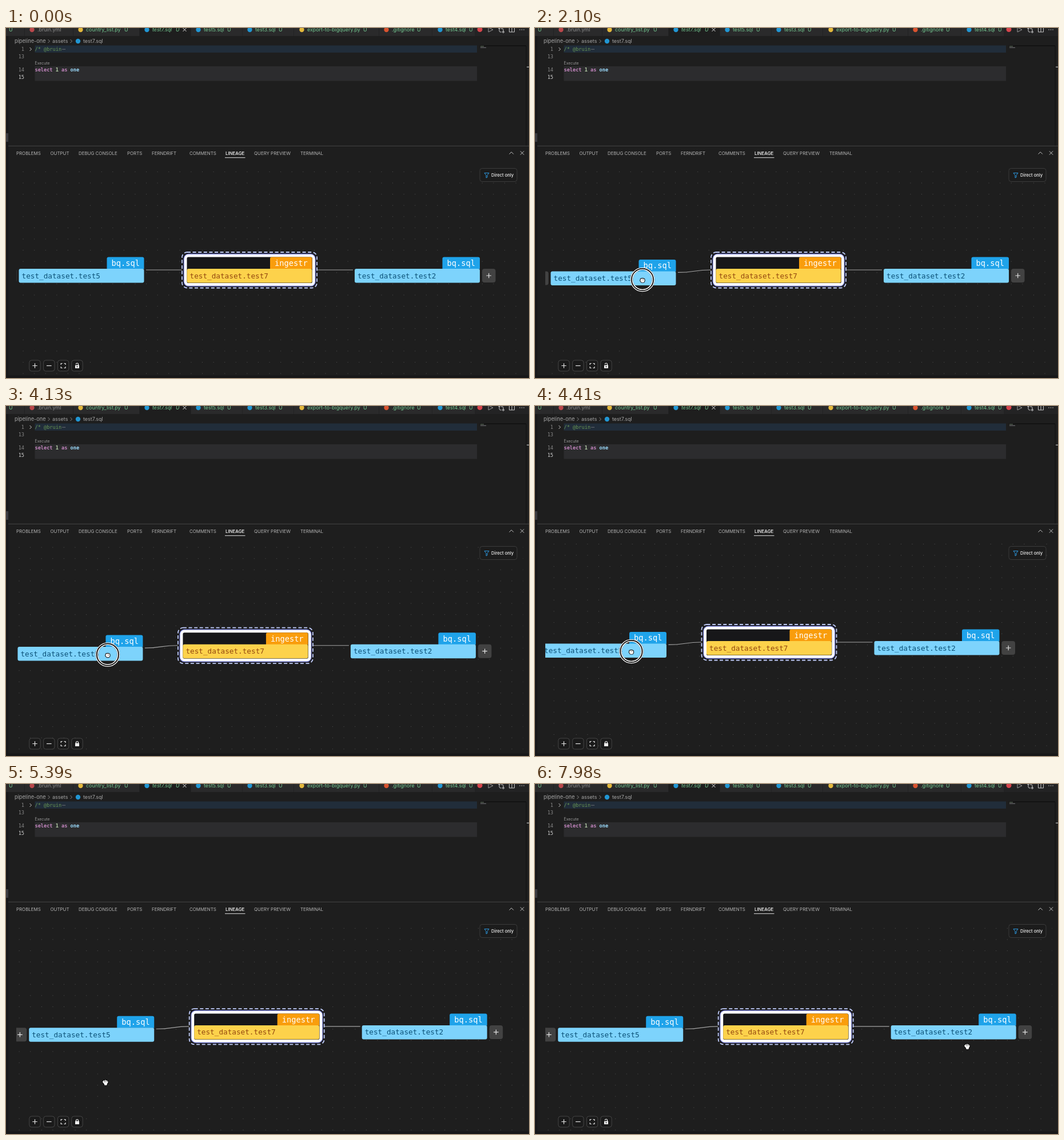
Write an HTML page with a canvas that moves like this. It is 915 by 612 pixels and loops after 8 s.

```html
<!DOCTYPE html>
<html lang="en">
<head>
<meta charset="utf-8">
<title>Lineage panel</title>
<style>
html, body { margin: 0; width: 100%; height: 100%; overflow: hidden; background: #1e1e1e; }
canvas { display: block; }
</style>
</head>
<body>
<canvas id="stage" width="915" height="612"></canvas>
<script>
const ctx = document.getElementById('stage').getContext('2d');
const LOOP = 8000, STEP = 70;
const UI = 'Inter, sans-serif', MONO = '"DejaVu Sans Mono", monospace';
const GREEN = '#73c991', SQL_BLUE = '#2196d3';

// Keys are [time, x, y]
const cursorKeys = [
  [350, 423, 605], [420, 300, 543], [490, 164, 473], [630, 164, 473], [910, 182, 435],
  [1260, 182, 435], [1540, 184, 452], [1680, 184, 455], [1890, 184, 455], [2100, 188, 440],
  [2170, 188, 440], [2520, 137, 593], [2590, 137, 593], [2940, 123.5, 589],
  [3570, 123.5, 589], [3850, 185, 439], [3920, 185, 439], [4410, 168.5, 429],
  [4480, 168.5, 429], [4900, 210, 451], [5110, 197.7, 440], [5320, 197.7, 440],
  [5460, 150, 602], [5600, 150, 602], [5950, 127.5, 595], [6720, 127.5, 595],
  [6860, 403, 438], [6930, 126, 584], [7210, 126, 584], [7420, 228, 478],
  [7560, 228, 478], [7700, 480, 456], [7770, 690, 484], [7840, 690, 484], [7980, 756, 458]
];
const nodeKeys = [
  [1260, 0, 0], [1540, 1, 17.3], [1680, 1, 20], [1890, 1, 20], [2100, 5, 4.4]
];
const panKeys = [
  [3920, 0, 0], [4410, -16.5, -10], [4480, -16.5, -10], [4900, 25, 12.3], [5110, 12.7, 0.9]
];
const presses = [[1050, 2240], [3080, 3290], [3920, 5250], [6580, 6720]];

function at(keys, t) {
  const i = keys.findIndex(k => k[0] > t);
  if (i === 0) return keys[0].slice(1);
  if (i < 0) return keys[keys.length - 1].slice(1);
  const [a, b] = [keys[i - 1], keys[i]], p = (t - a[0]) / (b[0] - a[0]);
  return [a[1] + (b[1] - a[1]) * p, a[2] + (b[2] - a[2]) * p];
}

function text(str, x, y, color, size, family = UI, style = '') {
  ctx.font = `${style} ${size}px ${family}`;
  ctx.fillStyle = color;
  ctx.fillText(str, x, y);
}
function rect(x, y, w, h, color) {
  ctx.fillStyle = color;
  ctx.fillRect(x, y, w, h);
}
function round(x, y, w, h, r, fill, stroke, width = 1) {
  ctx.beginPath();
  ctx.roundRect(x, y, w, h, r);
  if (fill) { ctx.fillStyle = fill; ctx.fill(); }
  if (stroke) { ctx.strokeStyle = stroke; ctx.lineWidth = width; ctx.stroke(); }
}
function line(d, color, width = 1) {
  ctx.strokeStyle = color;
  ctx.lineWidth = width;
  ctx.stroke(new Path2D(d));
}
function dot(x, y, r, color) {
  ctx.beginPath();
  ctx.arc(x, y, r, 0, 7);
  ctx.fillStyle = color;
  ctx.fill();
}
function ring(x, y, r, color, width) {
  ctx.beginPath();
  ctx.arc(x, y, r, 0, 7);
  ctx.strokeStyle = color;
  ctx.lineWidth = width;
  ctx.stroke();
}
function plus(x, y, arm, color = '#e4e4e4') {
  line(`M${x - arm} ${y}h${2 * arm}M${x} ${y - arm}v${2 * arm}`, color, 1.2);
}

// [left edge, icon colour, label, label x, status x]
const fileTabs = [
  [32, '#b9474b', '.bruin.yml', 55, 0],
  [117, '#e3b83c', 'country_list.py', 140, 207],
  [233, SQL_BLUE, 'test7.sql', 256, 297],
  [323, SQL_BLUE, 'test5.sql', 346, 387],
  [413, SQL_BLUE, 'test3.sql', 436, 477],
  [503, '#e3b83c', 'export-to-bigquery.py', 527, 625],
  [652, '#d9532f', '.gitignore', 675, 719],
  [745, SQL_BLUE, 'test4.sql', 769, 810]
];

function drawTabs() {
  rect(0, 0, 915, 14, '#2a2a2b');
  rect(820, 0, 95, 14, '#232324');
  rect(233, 0, 90, 14, '#1e1e1e');
  text('U', 5, 6, GREEN, 8.8);
  for (const [left, color, label, x, status] of fileTabs) {
    const style = left === 233 ? 'italic' : '';
    rect(left, 0, 1, 14, '#222223');
    dot(x - 9.5, 3, 4.2, color);
    text(label, x, 6, status ? GREEN : '#8f8f8f', 8.9, UI, style);
    if (status) text('U', status, 6, GREEN, 8.8, UI, style);
  }
  line('M309.5 0l6 6m0-6l-6 6', '#e0e0e0');
  dot(829, 2.5, 4.5, '#d6454c');
  line('M844 -1v8l8-4z', '#999');
  line('M863 0v5a2 2 0 0 0 2 2h2M870 7v-4a2 2 0 0 0-2-2h-2', '#c5c5c5');
  ring(863, 0, 1.4, '#c5c5c5', 1);
  ring(870, 7, 1.4, '#c5c5c5', 1);
  line('M880.5 -1v8h9v-8M885 -1v8', '#c5c5c5');
  for (let x = 899; x < 908; x += 3.5) dot(x, 3, 0.8, '#c5c5c5');
}

function drawEditor() {
  const gray = '#a5a5a5';
  text('pipeline-one', 15, 26.3, gray, 9.2);
  text('assets', 81, 26.3, gray, 9);
  text('test7.sql', 135, 26.3, gray, 9);
  line('M73.500 20l3 3-3 3M112.500 20l3 3-3 3', '#888');
  dot(126, 23, 4.2, SQL_BLUE);

  rect(50.5, 30.5, 773.5, 12.5, '#212d3a');
  rect(50.5, 67, 773.5, 25.5, '#2c2c2e');
  ctx.textAlign = 'right';
  [['1', 40], ['13', 52.8], ['14', 76.2], ['15', 89]].forEach(([n, y]) =>
    text(n, 32, y, n === '15' ? '#d0d0d0' : '#858585', 8.6, MONO));
  ctx.textAlign = 'left';
  line('M41.500 34l3 3-3 3', '#c5c5c5');
  text('/* @bruin', 50.5, 40, '#6a9955', 8.6, MONO);
  for (let x = 98.5; x < 104; x += 2) rect(x, 36.7, 1.4, 1, '#8a8a8a');
  text('Execute', 50.5, 64.2, '#999', 6.9);
  [['select', 0, '#c586c0'], ['1', 7, '#b5cea8'], ['as', 9, '#c586c0'], ['one', 12, '#9cdcfe']]
    .forEach(([word, col, color]) =>
      text(word, 50.5 + col * 5.17, 76.2, color, 8.6, MONO, 'bold'));

  rect(829, 30.5, 81, 1.2, '#0c0c0c');
  rect(830, 31.500, 6, 1, '#6a7d68');
  rect(830, 33.800, 10, 1, '#77777c');
  rect(909.5, 31, 1, 175, '#111');
  rect(911, 67.5, 4, 1.5, '#a0a0a0');
  rect(0, 14, 4, 598, '#18181a');
  rect(0, 184, 4, 15, '#3a3a40');
}

function drawPanelHeader() {
  rect(4, 205.8, 911, 1, '#454545');
  [['PROBLEMS', 18], ['OUTPUT', 77.5], ['DEBUG CONSOLE', 127], ['PORTS', 212],
   ['FERNDRIFT', 255], ['COMMENTS', 321], ['LINEAGE', 384], ['QUERY PREVIEW', 434],
   ['TERMINAL', 515]].forEach(([label, x]) => {
    const active = label === 'LINEAGE';
    text(label, x, 222, active ? '#fff' : '#b4b4b4', 7.9, UI, active ? '500' : '');
  });
  rect(383, 226.2, 35.5, 1, '#e0e0e0');
  line('M880.500 220.500l3.700-3.700 3.700 3.700M899.800 215.300l6.400 6.400m0-6.400l-6.400 6.400', '#c5c5c5');
}

function drawPlusButton(x, y) {
  round(x, y, 23.5, 24, 4, '#424242');
  plus(x + 11.7, y + 12, 4.3);
}

// x, y is the top left corner of the body; the tag sits above its right end.
function drawNode(x, y, name, tag, tagWidth, [body, ink, tagColor]) {
  round(x + 219 - tagWidth, y - 20.5, tagWidth, 21, [3, 3, 0, 0], tagColor);
  round(x, y, 219, 24.5, 3, body);
  text(tag, x + 219 - tagWidth + 8, y - 5, '#fff', 13.7, MONO);
  text(name, x + 5, y + 16.5, ink, 12.7, MONO);
}

function drawGraph(dx, dy, px, py) {
  const gap = 19.59, sky = ['#7dd3fc', '#0c5278', '#1fa3ea'], amber = ['#fdd24b', '#93470f', '#f99d0c'];
  ctx.save();
  ctx.beginPath();
  ctx.rect(18, 237, 886.500, 370);
  ctx.clip();
  for (let x = 30 + px - 2 * gap; x < 905; x += gap)
    for (let y = 251.4 + py - gap; y < 607; y += gap)
      rect(x - 0.5, y - 0.5, 1.1, 1.1, '#4c4c4c');

  ctx.translate(px, py);
  const sx = 245 + dx, sy = 423 + dy, mid = (sx + 307.5) / 2;
  line(`M${sx} ${sy}C${mid} ${sy} ${mid} 423 307.500 423M544.500 423H607`, '#a3a3a3', 1.1);

  drawPlusButton(-5 + dx, 421 + dy);
  drawNode(22.5 + dx, 421 + dy, 'test_dataset.test5', 'bq.sql', 65, sky);
  drawNode(610, 421, 'test_dataset.test2', 'bq.sql', 65.5, sky);
  drawPlusButton(833, 421);

  ctx.setLineDash([6, 3.6]);
  round(308, 392, 236, 62.5, 9, null, '#bfcbfb', 1.8);
  ctx.setLineDash([]);
  round(311.3, 395.3, 229.7, 56, 8, '#171719', '#626bd0', 1.4);
  round(314.1, 398.2, 224.2, 50.2, 5, null, '#fff', 4.8);
  drawNode(316.5, 421, 'test_dataset.test7', 'ingestr', 73.5, amber);
  ctx.restore();
}

function drawControls(locked, hover) {
  round(829, 245.500, 65, 23, 4, '#1c1c1c', '#3b3b3b');
  line('M837 253.500h8l-3 4v3.500l-2 1v-4.500z', '#2b95dc');
  text('Direct only', 849, 260, '#f0f0f0', 7.6, UI, '500');

  for (const x of [50.5, 75.3, 100.1, 124.5])
    round(x - 9.7, 581, 19.4, 19, 4, hover && x > 120 ? '#424242' : '#1a1a1a', '#454545');
  plus(50.5, 590.5, 4.2);
  line('M71 590.500h8.600', '#e4e4e4', 1.2);
  line('M96.200 589v-2.500h2.500M101.500 586.500h2.500v2.500M104 592v2.500h-2.500M98.700 594.500h-2.500v-2.500', '#e4e4e4', 1.2);
  rect(121, 589.5, 7, 5.5, '#eee');
  line(locked ? 'M122.500 590v-1.500a2 2 0 0 1 4 0v1.500' : 'M122.500 588a2 2 0 0 1 4 0v2', '#eee', 1.2);
  if (!locked) dot(124.5, 592.2, 1, '#222');

  rect(0, 607.5, 915, 4.5, '#171718');
}

// Hands are strokes: black underneath, white on top.
const hands = {
  open: 'M-3.500 0L-4-1.500M-2 0L-2.500-3M0 0V-3.800M2-.500L2.500-3M3.500 0L4-1M-2.500 1H3M-1.500 2.500H2.500M-1 4H2',
  fist: 'M-2.500 0V-1.500M-.800 0V-2M1-1V-2M2.700 0V-1.300M-3 1H3M-2 2.300H2.500M-1.500 3H2',
  pointer: 'M0 1V7M2 4.500V7M3.700 5V7M-2.300 6L-.500 8M0 7.500H4M.500 9H3.700M1 10H3.500'
};
function drawCursor(x, y, pressed, onButton) {
  if (pressed) {
    ring(x, y, 19, '#000', 4.6);
    ring(x, y, 20.6, '#fff', 1.3);
    ring(x, y, 17.5, '#fff', 1.5);
  }
  ctx.save();
  ctx.translate(x, y + (onButton ? 0 : 0.8));
  ctx.lineCap = ctx.lineJoin = 'round';
  const shape = hands[onButton ? 'pointer' : pressed ? 'fist' : 'open'];
  line(shape, '#000', 3.6);
  line(shape, '#fff', 1.7);
  ctx.restore();
}

function draw(t) {
  const [x, y] = at(cursorKeys, t);
  const pressed = presses.some(([from, to]) => t >= from && t < to);
  const onButton = x > 114 && x < 135 && y > 580 && y < 601;
  rect(0, 0, 915, 612, '#1e1e1e');
  drawTabs();
  drawEditor();
  drawPanelHeader();
  drawGraph(...at(nodeKeys, t), ...at(panKeys, t));
  drawControls(t >= 3290 && t < 6720, onButton);
  if (t >= 350) drawCursor(x, y, pressed, onButton);
}

function frame() {
  const t = performance.now() % LOOP;
  draw(Math.floor(t / STEP) * STEP);
  requestAnimationFrame(frame);
}
frame();
</script>
</body>
</html>
```
